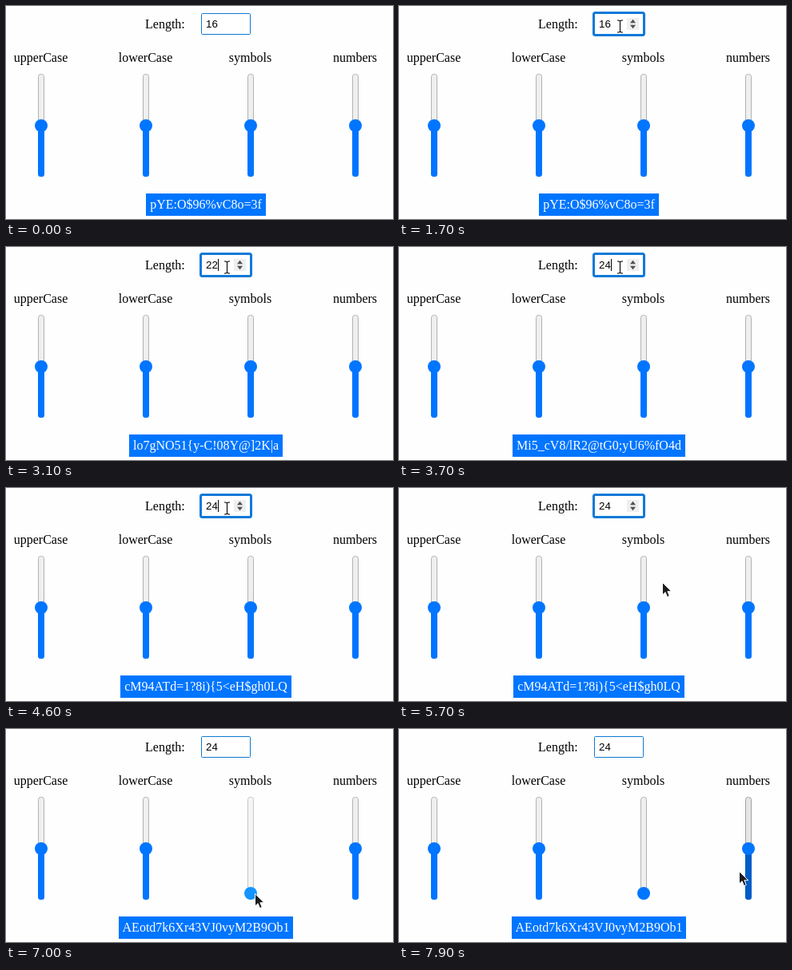
Recreate the animation shown at these times as an HTML page. Size 484x267 px, loop 8000 ms.

```html
<!DOCTYPE html>
<html lang="en">
<head>
<meta charset="utf-8">
<title>Password generator</title>
<style>
  html, body { margin: 0; width: 100%; height: 100%; overflow: hidden; background: #fefefe; }
  body { position: relative; font: 16px/18px "Liberation Serif", "Times New Roman", serif; color: #000; }
  body > * { position: absolute; }
  .label { top: 56px; width: 131px; text-align: center; }
  #length { left: 174px; top: 14px; }
  #value { left: 250px; top: 15px; font: 13.333px/15px "Liberation Sans", Arial, sans-serif; }
  #row { left: 0; top: 235px; width: 500px; text-align: center; }
  #password { display: inline-block; padding: 5px; background: #0075ff; color: #fff; white-space: pre; }
  svg { left: 0; top: 0; width: 484px; height: 267px; }
</style>
</head>
<body>
<div id="length">Length:</div>
<div id="row"><span id="password"></span></div>
<svg id="stage" viewBox="0 0 484 267">
  <rect id="frame" fill="#fff"/>
  <g id="spinner">
    <rect x="285" y="15" width="15" height="15" fill="#efefef"/>
    <path d="M289 21.2L292.5 16.8L296 21.2ZM289 23.8L292.5 28.2L296 23.8Z" fill="#505050"/>
  </g>
  <g id="sliders"></g>
</svg>
<div id="value"></div>
<svg viewBox="0 0 484 267">
  <rect id="caret" x="265" y="15" width="1" height="15"/>
  <g id="beam" fill="none">
    <path d="M-3.5 -7.5H-1.5L0 -6.5L1.5 -7.5H3.5M0 -6.5V6.5M-3.5 7.5H-1.5L0 6.5L1.5 7.5H3.5" stroke="#fff" stroke-width="2.6"/>
    <path d="M-3.5 -7.5H-1.5L0 -6.5L1.5 -7.5H3.5M0 -6.5V6.5M-3.5 7.5H-1.5L0 6.5L1.5 7.5H3.5" stroke="#000" stroke-width="1.1"/>
  </g>
  <path id="arrow" d="M.5 .5V16L4.1 12.7L6.5 18.6L9.3 17.4L6.9 11.7H11.8Z" fill="#1c1c1c" stroke="#fff"/>
</svg>
<script>
const LOOP = 8000;
const $ = id => document.getElementById(id);

// Every table holds [start time, ...state]; a state lasts until the next one.
const entries = [
  [0, 16, 'pYE:O$96%vC8o=3f'],
  [2100, 17, 'f7Rzk2kL:x9!dQ3aM'],
  [2300, 18, 'gT5%Vq8{bN2=uD4s0!'],
  [2700, 20, 'Hb3=wX6(pG9%sA1n+4Sk'],
  [2900, 21, 'r8Kd[5Yt!2vQ<7hE0j}Lc'],
  [3100, 22, 'lo7gNO51{y-C!08Y@]2K|a'],
  [3300, 23, 'Xu4&nB7.aF1$xP9]oJ3#oW6'],
  [3700, 24, 'Mi5_cV8/lR2@tG0;yU6%fO4d'],
  [4100, 25, 'pA3*sH7+jD9?kY1^wS5(bN0q2'],
  [4600, 24, 'cM94ATd=1?8i){5<eH$gh0LQ'],
  [6900, 24, 'Gw2hN5;xK8eR1sQ4uT7zL0cL'],
  [7000, 24, 'AEotd7k6Xr43VJ0vyM2B9Ob1']
];
const pointer = [
  [0, ''],
  [600, 'arrow', 238, 17], [700, 'beam', 256.5, 27],
  [800, 'beam', 270.5, 26], [900, 'beam', 276.5, 25.5],
  [5500, 'arrow', 288, 40], [5600, 'arrow', 312, 78], [5700, 'arrow', 329, 118],
  [5800, 'arrow', 320, 140], [5900, 'arrow', 308, 142],
  [6100, 'arrow', 307, 145], [6200, 'arrow', 305, 149], [6300, 'arrow', 303, 151],
  [6800, 'arrow', 304, 155], [6900, 'arrow', 308, 186], [7000, 'arrow', 311, 206],
  [7100, 'arrow', 311, 212], [7200, 'arrow', 310, 225], [7300, 'arrow', 309, 234],
  [7800, 'arrow', 372, 205], [7900, 'arrow', 425, 178]
];
const focus = [[0, false], [1200, true], [6800, false]];
const spin = [[0, false], [700, true], [6800, false]];
const caret = [[0, false], [1200, true], [1700, false], [2100, true], [5500, false], [5900, true], [6500, false]];
const symbols = [
  [0, 150, 'idle', 'idle'], [5900, 150, 'hover', 'hover'], [6800, 150, 'active', 'active'],
  [6900, 186, 'active', 'active'], [7000, 206, 'active', 'active'],
  [7100, 206, 'hover', 'hover'], [7200, 206, 'idle', 'idle']
];
const numbers = [[0, 150, 'idle', 'idle'], [7900, 150, 'hover', 'idle']];
const still = [[0, 150, 'idle', 'idle']];

const colors = {
  idle: { track: '#efefef', edge: '#b2b2b2', fill: '#0075ff' },
  hover: { track: '#e5e5e5', edge: '#a0a0a0', fill: '#005cc8' },
  active: { track: '#f5f5f5', edge: '#c6c6c6', fill: '#1494ff' }
};

const at = (table, t) => table.findLast(row => row[0] <= t).slice(1);
const show = (el, on) => { el.style.display = on ? '' : 'none'; };
const set = (el, attrs) => { for (const k in attrs) el.setAttribute(k, attrs[k]); };
function add(name, attrs) {
  const el = document.createElementNS('http://www.w3.org/2000/svg', name);
  set(el, attrs);
  return $('sliders').appendChild(el);
}

function makeSlider(name, i, steps) {
  const label = document.createElement('div');
  label.className = 'label';
  label.textContent = name;
  label.style.left = i * 131 - 22 + 'px';
  document.body.prepend(label);
  const x = 44 + i * 131;
  const track = add('rect', { x: x - 3.5, y: 85.5, width: 7, height: 128, rx: 3 });
  const fill = add('path', {});
  const thumb = add('circle', { cx: x, r: 8 });
  return t => {
    const [y, bar, knob] = at(steps, t);
    const c = colors[bar];
    set(track, { fill: c.track, stroke: c.edge });
    set(fill, { d: `M${x - 4} ${y}V210.5Q${x - 4} 214 ${x - 0.5} 214H${x + 0.5}Q${x + 4} 214 ${x + 4} 210.5V${y}Z`, fill: c.fill });
    show(fill, y < 206);
    set(thumb, { cy: y, fill: colors[knob].fill });
  };
}

const sliders = [['upperCase', still], ['lowerCase', still], ['symbols', symbols], ['numbers', numbers]]
  .map(([name, steps], i) => makeSlider(name, i, steps));

function draw(t) {
  const [count, password] = at(entries, t);
  $('value').textContent = count;
  $('password').textContent = password;

  set($('frame'), at(focus, t)[0]
    ? { x: 243.5, y: 8.5, width: 63, height: 28, rx: 2, stroke: '#0f79d8', 'stroke-width': 3 }
    : { x: 244.5, y: 9.5, width: 61, height: 26, rx: 1, stroke: '#0f79d0', 'stroke-width': 1 });
  show($('spinner'), at(spin, t)[0]);
  show($('caret'), at(caret, t)[0]);
  sliders.forEach(update => update(t));

  const [shape, x, y] = at(pointer, t);
  for (const id of ['beam', 'arrow']) {
    show($(id), id === shape);
    if (id === shape) set($(id), { transform: `translate(${x} ${y})` });
  }
}

const start = performance.now();
function tick() {
  draw((performance.now() - start) % LOOP);
  requestAnimationFrame(tick);
}
tick();
</script>
</body>
</html>
```
